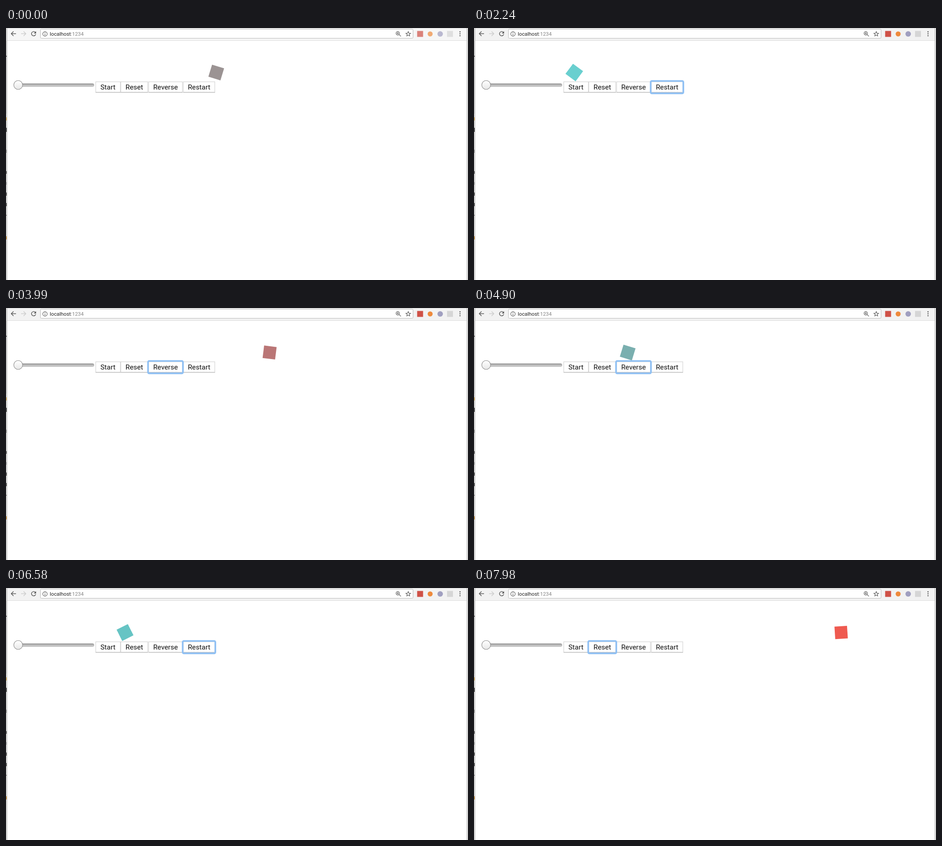
An HTML page for the animation above (8000 ms loop, 1013 by 553 pixels).

```html
<!DOCTYPE html>
<html lang="en">
<head>
<meta charset="utf-8">
<title>Animation controls</title>
<style>
  html, body { margin: 0; width: 100%; height: 100%; overflow: hidden; background: #fff; }
  svg { display: block; width: 1013px; height: 553px; }
  text { font-family: Roboto, Arial, sans-serif; }
  .url { font-size: 11.3px; }
  .label { font-size: 15.3px; fill: #111; }
  .icon { fill: none; stroke: #5c5c5c; stroke-width: 1.5; }
</style>
</head>
<body>
<svg viewBox="0 0 1013 553" xmlns="http://www.w3.org/2000/svg">
  <defs>
    <linearGradient id="track" x2="0" y2="1">
      <stop offset="0" stop-color="#858585"/>
      <stop offset=".4" stop-color="#b9b9b9"/>
      <stop offset="1" stop-color="#cfcfcf"/>
    </linearGradient>
    <linearGradient id="thumb" x2="0" y2="1">
      <stop offset="0" stop-color="#fff"/>
      <stop offset=".5" stop-color="#f4f4f4"/>
      <stop offset="1" stop-color="#e6e6e6"/>
    </linearGradient>
    <filter id="soft" x="-20%" y="-40%" width="140%" height="180%">
      <feGaussianBlur stdDeviation=".7"/>
    </filter>
  </defs>

  <rect width="1013" height="553" fill="#fff"/>
  <rect id="bar" width="1013" height="27" fill="#f2f2f2"/>
  <path d="M2 27.5H1010" stroke="#dcdcdc"/>
  <path d="M0 .5H1013" stroke="#d4d4d4"/>

  <!-- window edges -->
  <rect width="2" height="553" fill="#dedede"/>
  <rect y="28" width="2" height="160" fill="#cfcfcf"/>
  <g id="scraps"></g>
  <path d="M2 0V553" stroke="#a8a8a8"/>
  <rect x="1010" width="3" height="553" fill="#dcdcdc"/>
  <path d="M1010.5 0V553" stroke="#bcbcbc"/>

  <!-- toolbar -->
  <path class="icon" d="M22 12.5H12M16.5 7.5L11.5 12.5L16.5 17.5"/>
  <path class="icon" style="stroke:#cdcdcd" d="M33 12.5H43M38.5 7.5L43.5 12.5L38.5 17.5"/>
  <g id="reload">
    <path class="icon" d="M64 9.3A4.7 4.7 0 1 0 65.2 13.6"/>
    <path d="M66 7V12H61Z" fill="#5c5c5c"/>
  </g>
  <path id="stop" class="icon" d="M56.5 8.5L64.5 16.5M64.5 8.5L56.5 16.5"/>
  <rect x="75.5" y="2.5" width="817" height="20" rx="2" fill="#fff" stroke="#b9b9b9"/>
  <circle class="icon" style="stroke-width:1.1" cx="85.5" cy="13" r="4.9"/>
  <path d="M85.5 12.2V16M85.5 9.8V11.1" stroke="#5c5c5c" stroke-width="1.2"/>
  <text class="url" x="96" y="17" fill="#222">localhost<tspan fill="#858585">:1234</tspan></text>
  <g class="icon" style="stroke-width:1.2">
    <circle cx="859" cy="11.6" r="3.7"/>
    <path d="M861.8 14.4L866 18.4M857 11.6H861M859 9.6V13.6"/>
    <path id="star"/>
  </g>
  <g id="extensions">
    <rect x="901.5" y="6.5" width="13" height="13" fill="#cf5147"/>
    <circle cx="930" cy="13" r="5.5" fill="#ee8a3c"/>
    <circle cx="952" cy="13" r="6" fill="#a09fc0"/>
    <rect x="967" y="6.5" width="13" height="13" fill="#d6d6d6"/>
  </g>
  <g fill="#5c5c5c">
    <circle cx="995.5" cy="8.4" r="1.3"/>
    <circle cx="995.5" cy="12.7" r="1.3"/>
    <circle cx="995.5" cy="17" r="1.3"/>
  </g>

  <g id="page">
    <rect x="22.5" y="122" width="170.5" height="6.5" rx="3.2" fill="url(#track)" stroke="#9a9a9a" stroke-width=".6"/>
    <circle cx="26.7" cy="125" r="9.7" fill="url(#thumb)" stroke="#8c8c8c" stroke-width="1.1"/>
    <g id="buttons"></g>
    <rect id="ring" y="116.2" height="27.2" rx="2.5" fill="none" stroke="#8fc0f4" stroke-width="3.6" filter="url(#soft)"/>
    <rect id="box" x="-13.8" y="-13.8" width="27.6" height="27.6"/>
  </g>
</svg>

<script>
const LOOP = 8000, STEP = 70, HOME = 27;
const $ = id => document.getElementById(id);

function add(parent, tag, attrs, text) {
  const el = document.createElementNS("http://www.w3.org/2000/svg", tag);
  for (const key in attrs) el.setAttribute(key, attrs[key]);
  if (text) el.textContent = text;
  parent.append(el);
}

// name: left edge, width, text start
const buttons = {
  Start: [197, 54, 207],
  Reset: [252, 59, 262],
  Reverse: [313, 74, 322.7],
  Restart: [389, 69, 398.7]
};
for (const [name, [x, w, tx]] of Object.entries(buttons)) {
  add($("buttons"), "rect", { x: x - .2, y: 118, width: w, height: 23, fill: "#fff", stroke: "#cbcbcb" });
  add($("buttons"), "path", { d: `M${x - .5} 141.4h${w + .8}`, stroke: "#b4b4b4" });
  add($("buttons"), "text", { x: tx, y: 135.2, class: "label" }, name);
}

// bits of the window behind, showing at the left edge
const scraps = [[61, 2, "#333"], [196, 7, "#d6a84c"], [219, 9, "#333"], [267, 7, "#999"], [314, 6, "#555"],
  [338, 6, "#aaa"], [361, 7, "#444"], [384, 7, "#444"], [410, 2, "#777"], [457, 7, "#c98a2c"]];
for (const [y, height, fill] of scraps) add($("scraps"), "rect", { x: 0, y, width: 2, height, fill });

const star = Array.from({ length: 10 }, (_, i) => {
  const r = i % 2 ? 2.4 : 5.4, a = i * Math.PI / 5;
  return `${882 + r * Math.sin(a)} ${13.2 - r * Math.cos(a)}`;
});
$("star").setAttribute("d", `M${star.join("L")}Z`);

// time, centre of the box
const path = [[0, 461], [560, 243], [839, 243], [840, HOME], [1750, HOME], [3010, 523], [3290, 633],
  [3710, 468], [3990, 578], [4140, 634], [4900, 337], [5690, HOME], [5970, 137], [5980, HOME],
  [6580, 261], [7980, 805], [8000, 811]];

// distance travelled, angle, red, green, blue
const looks = [[0, 0, 133, 255, 255], [120, 79, 109, 226, 226], [234, 153.4, 102, 196, 196],
  [310, 197, 122, 175, 175], [434, 287, 155, 147, 147], [496, 332.5, 172, 129, 129],
  [551, 367, 186, 118, 118], [778, 536.3, 239, 90, 80], [850, 586, 236, 60, 45]];

const focus = [[0, ""], [1610, "Restart"], [3220, "Reverse"], [5880, "Restart"], [7840, "Reset"]];

function mix(table, at) {
  let i = 1;
  while (i < table.length - 1 && table[i][0] < at) i++;
  const a = table[i - 1], b = table[i];
  const k = Math.min(1, Math.max(0, (at - a[0]) / (b[0] - a[0])));
  return a.slice(1).map((v, n) => v + (b[n + 1] - v) * k);
}

const show = (id, on) => $(id).setAttribute("visibility", on ? "visible" : "hidden");

function draw(time) {
  const t = Math.floor(time / STEP) * STEP;
  const [x] = mix(path, t);
  const [angle, ...rgb] = mix(looks, x - HOME);
  $("box").setAttribute("transform", `translate(${x} 97.7) rotate(${angle})`);
  $("box").setAttribute("fill", `rgb(${rgb.map(Math.round)})`);

  // inactive window at first, then a page reload
  $("extensions").setAttribute("opacity", t < STEP ? .7 : 1);
  $("bar").setAttribute("fill", t < STEP ? "#f6f6f6" : "#f2f2f2");
  const loading = t >= 840 && t < 1050;
  show("stop", loading);
  show("reload", !loading);
  $("page").setAttribute("display", t === 840 ? "none" : "inline");

  const name = focus.filter(f => f[0] <= t).pop()[1];
  show("ring", name);
  if (name) {
    const [left, width] = buttons[name];
    $("ring").setAttribute("x", left - 1.6);
    $("ring").setAttribute("width", width + 2.6);
  }
}

const start = performance.now();
function tick() {
  draw((performance.now() - start) % LOOP);
  requestAnimationFrame(tick);
}
tick();
</script>
</body>
</html>
```
